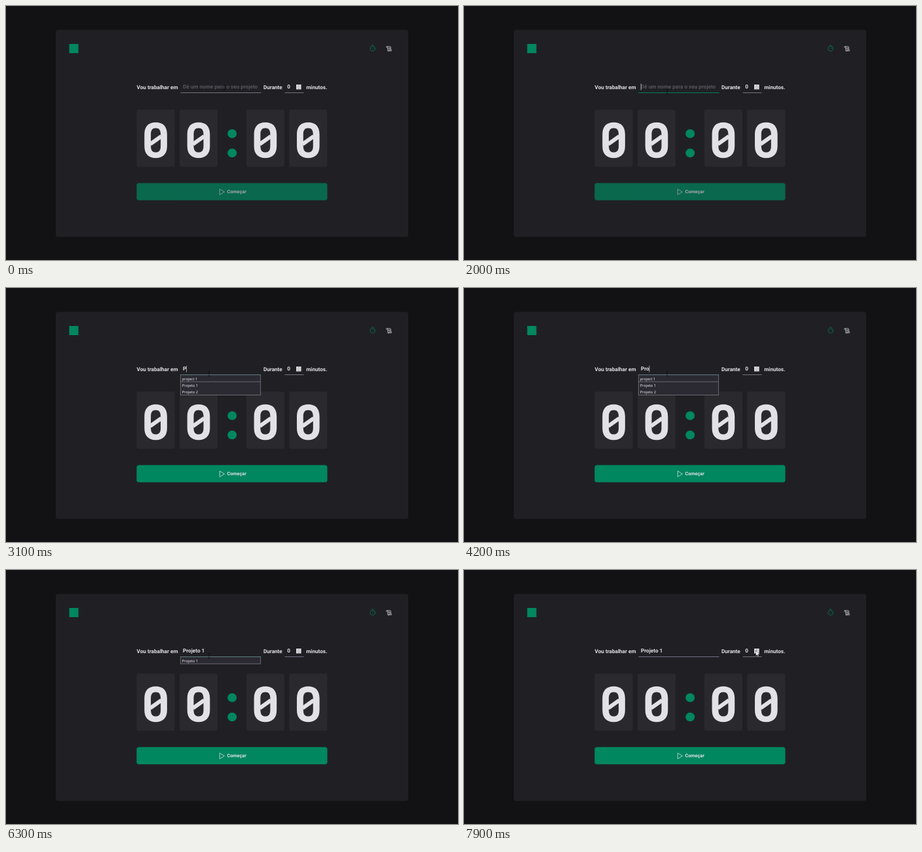
An HTML page that plays this animation: 690 by 388 pixels, repeating every 8000 ms.

```html
<!DOCTYPE html>
<html lang="pt-BR">
<head>
<meta charset="utf-8">
<title>Timer</title>
<style>
  html, body { margin: 0; width: 100%; height: 100%; overflow: hidden; background: #121214; }
  svg { display: block; width: 100%; height: 100%; }
  text { font: 700 8.18px Roboto, sans-serif; fill: #e1e1e6; white-space: pre; text-rendering: geometricPrecision; }
  .option { font: 400 5.75px "Open Sans", sans-serif; fill: #fbfbfe; }
  .line { stroke: #7c7c8a; stroke-width: .9; }
  .icon { fill: none; stroke-width: 16; stroke-linecap: round; stroke-linejoin: round; }
</style>
</head>
<body>
<svg viewBox="0 0 690 388">
  <defs>
    <g id="zero">
      <rect x="-29.1" y="-46.8" width="58.2" height="87.2" rx="3.6" fill="#29292e"/>
      <path fill="#e1e1e6" fill-rule="evenodd" d="M-17.3-9C-17.3-21-11-27.2 0-27.2S17.3-21 17.3-9V9C17.3 21 11 27.2 0 27.2S-17.3 21-17.3 9Z
        M-7.5-9V9C-7.5 15.5-5 18.6 0 18.6S7.5 15.5 7.5 9V-9C7.5-15.5 5-18.6 0-18.6S-7.5-15.5-7.5-9Z"/>
      <path d="M-8.5 6 8.5-6" stroke="#e1e1e6" stroke-width="6"/>
    </g>
  </defs>
  <rect width="690" height="388" fill="#121214"/>
  <rect x="76" y="36.6" width="538" height="316.2" rx="3.6" fill="#202024"/>
  <rect x="96.5" y="58" width="14" height="14" fill="#00875f"/>

  <g class="icon" stroke="#00875f" transform="translate(554.1 59.3) scale(.0426)">
    <circle cx="128" cy="136" r="88"/>
    <path d="M128 136 168 96M104 16H152"/>
  </g>
  <g class="icon" stroke="#e1e1e6" transform="translate(579.2 59.5) scale(.0426)">
    <path d="M104 104H168M104 136H168M40 97A24 24 0 1 1 80 80V192A24 24 0 1 0 120 176H216A24 24 0 0 1 200 216H104M56 56H168A24 24 0 0 1 192 80V176"/>
  </g>

  <text x="199.5" y="126.8">Vou trabalhar em</text>
  <text id="field" x="270" y="126.4"></text>
  <path id="fieldLine" class="line" d="M266.4 132.5H389.4"/>
  <text x="392.9" y="126.8">Durante</text>
  <text x="429.3" y="126.4">0</text>
  <path class="line" d="M425.6 132.5H454.6"/>
  <rect x="443" y="120" width="7.6" height="7.4" fill="#dcdce0"/>
  <path d="M445.5 122.6 446.8 121.4 448.1 122.6M445.5 125 446.8 126.2 448.1 125" fill="none" stroke="#66666c" stroke-width=".7"/>
  <path d="M443.6 123.7H450" stroke="#b4b4ba" stroke-width=".4"/>
  <text x="458.2" y="126.8">minutos.</text>
  <path id="caret" d="M0 118.6V128.6" stroke="#e1e1e6" stroke-width=".7"/>

  <use href="#zero" x="228.6" y="205"/>
  <use href="#zero" x="294" y="205"/>
  <use href="#zero" x="395.9" y="205"/>
  <use href="#zero" x="461.3" y="205"/>
  <g fill="#00875f">
    <ellipse cx="345.2" cy="195" rx="7" ry="6.8"/>
    <ellipse cx="345.2" cy="224.5" rx="7" ry="6.8"/>
  </g>

  <g id="button">
    <rect x="199.4" y="270.6" width="291.1" height="26.2" rx="3.6" fill="#00875f"/>
    <path d="M326.2 279.6V288.4L333.4 284Z" fill="none" stroke="#e1e1e6" stroke-width=".75" stroke-linejoin="round"/>
    <text x="337.4" y="286.4" style="font-size:7.27px">Começar</text>
  </g>

  <g id="list">
    <rect id="listBox" x="266.3" y="132.7" width="122.4" fill="#2b2a33" stroke="#85858c" stroke-width=".7"/>
    <path id="divider" d="M266.3 143.2H388.7" stroke="#85858c" stroke-width=".7"/>
    <text class="option" x="268.8" y="140.6"></text>
    <text class="option" x="268.8" y="151.1"></text>
    <text class="option" x="268.8" y="160.7"></text>
  </g>

  <path id="beam" d="M-1.4-3.6H1.4M0-3.6V3.6M-1.4 3.6H1.4" stroke="#0c0c0e" stroke-width=".7"/>
  <path id="arrow" d="M0 0V8.4L2 6.6 3.3 9.6 4.6 9 3.3 6.1H5.9Z" fill="#fff" stroke="#111" stroke-width=".5"/>
</svg>
<script>
const LOOP = 8000, FRAME = 100, BLUR = 7700;
const $ = id => document.getElementById(id);
const options = document.querySelectorAll('.option');
const pen = document.createElement('canvas').getContext('2d');

const typed = [[0, ''], [3100, 'P'], [3200, 'Pr'], [3400, 'Pro'], [4500, 'Proj'], [4600, 'Proje'],
  [4800, 'Projet'], [5200, 'Projeto'], [5300, 'Projeto '], [6000, 'Projeto 1']];
const blinks = [1000, 1500, 2000, 2600, 3100, 3700, 4200, 5300, 5800, 6300, 6800, 7400];
const suggestions = ['project 1', 'Projeto 1', 'Projeto 2'];
// time, x, y of the pointer
const route = [[300, 333, 125], [400, 326, 127], [500, 315, 130], [600, 310, 131], [6500, 310, 131],
  [6600, 322, 132], [6800, 400, 145], [7000, 485, 149], [7200, 447.5, 141.5], [7300, 447.5, 141.5],
  [7500, 449, 134], [7700, 446, 124], [7900, 445.5, 122.8]];

const show = (el, on) => el.setAttribute('visibility', on ? 'visible' : 'hidden');
const place = (el, x, y) => el.setAttribute('transform', `translate(${x} ${y})`);

function textWidth(s) {
  pen.font = '700 81.8px Roboto, sans-serif';
  return pen.measureText(s).width / 10;
}

function pointerAt(t) {
  const next = route.findIndex(p => p[0] > t);
  if (next === 0) return route[0].slice(1);
  if (next < 0) return route[route.length - 1].slice(1);
  const [t0, x0, y0] = route[next - 1], [t1, x1, y1] = route[next];
  const k = (t - t0) / (t1 - t0);
  return [x0 + (x1 - x0) * k, y0 + (y1 - y0) * k];
}

function drawList(value, focused) {
  const found = value ? suggestions.filter(s => s.toLowerCase().startsWith(value.toLowerCase())) : [];
  const open = focused && found.length > 0;
  show($('list'), open);
  show($('divider'), open && found.length > 1);
  options.forEach((el, i) => { el.textContent = found[i] || ''; });
  $('listBox').setAttribute('height', [0, 10.5, 20.5, 30.9][found.length]);
}

function draw(time) {
  const t = Math.floor(time / FRAME) * FRAME;
  const value = typed.filter(s => s[0] <= t).pop()[1];
  const focused = t >= 1000 && t < BLUR;

  $('field').textContent = value || 'Dê um nome para o seu projeto';
  $('field').style.fill = value ? '#e1e1e6' : '#55555d';
  $('fieldLine').style.stroke = focused ? '#00875f' : '#7c7c8a';
  $('button').setAttribute('opacity', value ? 1 : .7);
  drawList(value, focused);

  place($('caret'), 270.2 + textWidth(value), 0);
  show($('caret'), focused && blinks.filter(b => b <= t).length % 2 === 1);

  const [x, y] = pointerAt(t);
  const overField = x > 266 && x < 389 && y < 133;
  place($('beam'), x, y);
  place($('arrow'), x, y);
  show($('beam'), overField);
  show($('arrow'), !overField);
}

function tick() {
  draw(performance.now() % LOOP);
  requestAnimationFrame(tick);
}
tick();
</script>
</body>
</html>
```
